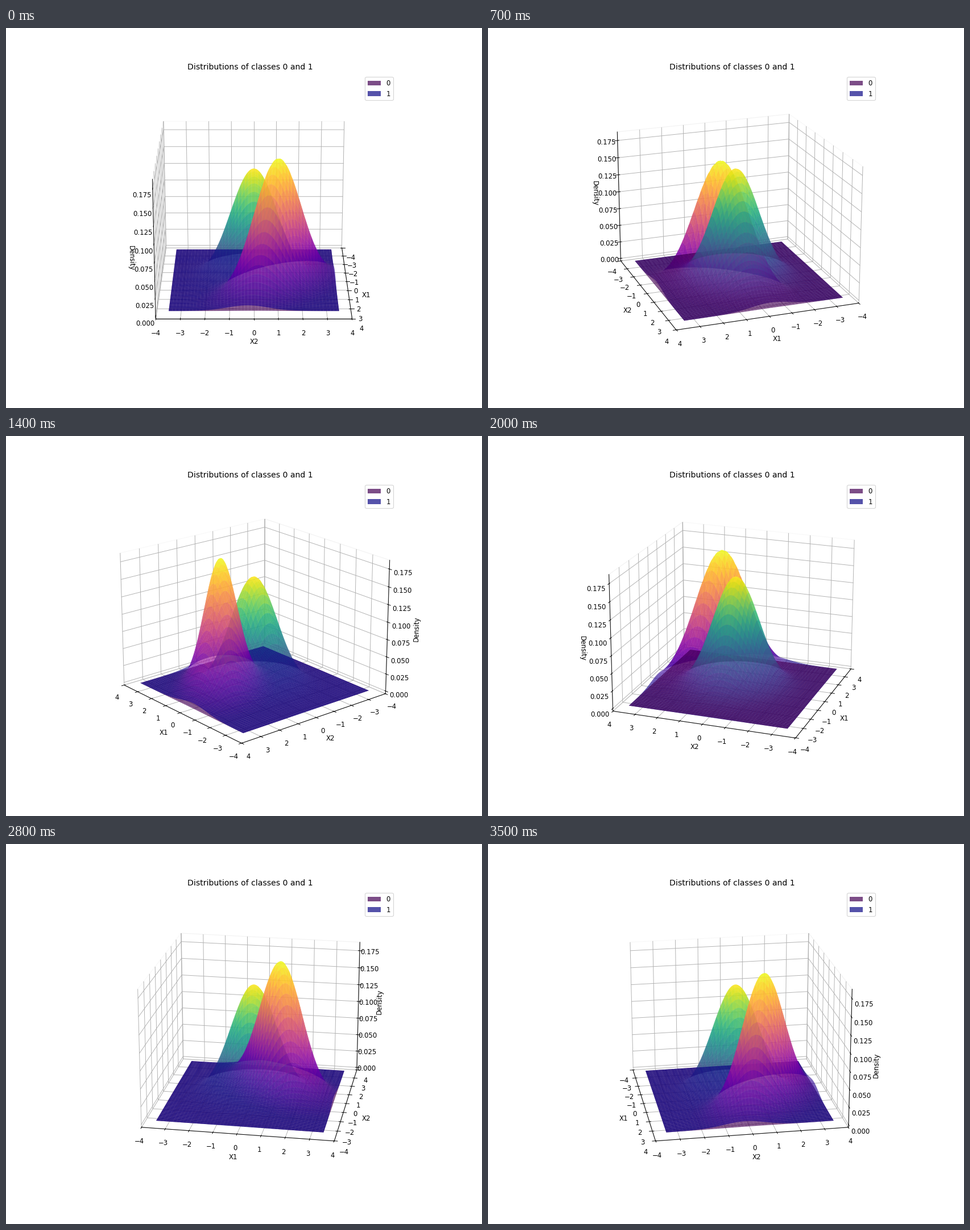
Write a matplotlib script that moves like this. It is 837 by 669 pixels and loops after 3.6 s.

```python
import numpy as np
import matplotlib.pyplot as plt
from matplotlib.animation import FuncAnimation

DPI = 83.7
FRAMES = 36


def gaussian(x, y, mean, rho):
    """Bivariate normal density with unit variances and correlation rho."""
    dx, dy = x - mean[0], y - mean[1]
    det = 1 - rho**2
    q = (dx**2 - 2 * rho * dx * dy + dy**2) / det
    return np.exp(-q / 2) / (2 * np.pi * np.sqrt(det))


fig = plt.figure(figsize=(837 / DPI, 669 / DPI), dpi=DPI)
ax = fig.add_subplot(projection="3d")

side = np.linspace(-3.5, 3.5, 100)
x1, x2 = np.meshgrid(side, side)
classes = [
    ("0", (0, 0), 0.0, "viridis"),
    ("1", (1, 1), -0.5, "plasma"),
]
for label, mean, rho, cmap in classes:
    ax.plot_surface(x1, x2, gaussian(x1, x2, mean, rho),
                    cmap=cmap, alpha=0.7, label=label)

for axis in (ax.xaxis, ax.yaxis, ax.zaxis):
    axis.pane.fill = False
ax.set_xlabel("X1")
ax.set_ylabel("X2")
ax.set_zlabel("Density")
ax.set_title("Distributions of classes 0 and 1")
ax.legend()


def update(i):
    ax.view_init(elev=20, azim=i * 360 / FRAMES)
    return []


anim = FuncAnimation(fig, update, frames=FRAMES, interval=100,
                     repeat=True, repeat_delay=0)
plt.show()
```
